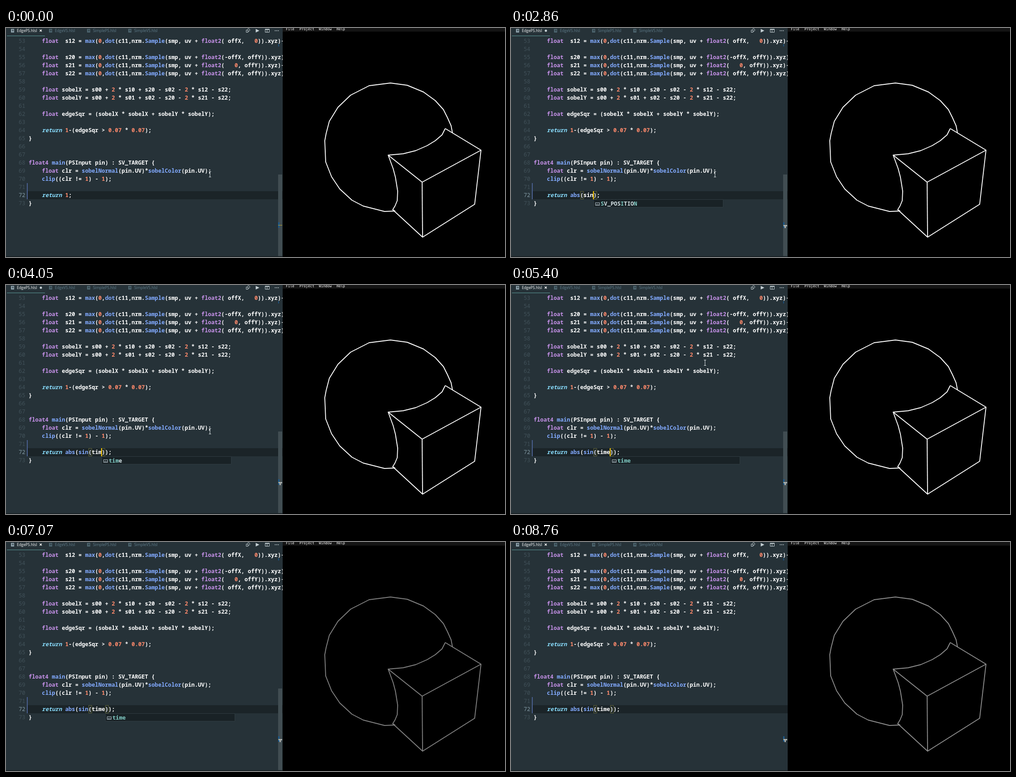
Write an HTML page with a canvas that moves like this. It is 1102x508 px and loops after 8.86 s.

```html
<!DOCTYPE html>
<html lang="en">
<head>
<meta charset="utf-8">
<title>Shader editing</title>
<style>
html, body { margin: 0; width: 100%; height: 100%; overflow: hidden; background: #000; }
canvas { display: block; }
</style>
</head>
<body>
<canvas id="stage" width="1102" height="508"></canvas>
<script>
const ctx = document.getElementById('stage').getContext('2d');
const LOOP = 8860, CHAR = 7.333, LEFT = 50, ROW = 18, FIRST = 53, BLINK = 470;
const CODE = 'bold 12.2px "Noto Sans Mono", monospace';
const colX = col => LEFT + col * CHAR;
const rowY = line => 29 + (line - FIRST) * ROW;

const source = `    float  s12 = max(0,dot(c11,nrm.Sample(smp, uv + float2( offX,   0)).xyz)-

    float  s20 = max(0,dot(c11,nrm.Sample(smp, uv + float2(-offX, offY)).xyz)-
    float  s21 = max(0,dot(c11,nrm.Sample(smp, uv + float2(   0, offY)).xyz)-
    float  s22 = max(0,dot(c11,nrm.Sample(smp, uv + float2( offX, offY)).xyz)-

    float sobelX = s00 + 2 * s10 + s20 - s02 - 2 * s12 - s22;
    float sobelY = s00 + 2 * s01 + s02 - s20 - 2 * s21 - s22;

    float edgeSqr = (sobelX * sobelX + sobelY * sobelY);

    return 1-(edgeSqr > 0.07 * 0.07);
}


float4 main(PSInput pin) : SV_TARGET {
    float clr = sobelNormal(pin.UV)*sobelColor(pin.UV);
    clip((clr != 1) - 1);


}`.split('\n');

// Typing: time, expression with | as caret, suggestions
const keys = [
  [-770, '1|'], [790, '|'], [1000, 'a|'], [1210, 'ab|'], [1460, 'abs|'],
  [1830, 'abs(|)'],
  [2510, 'abs(s|)'],
  [2580, 'abs(s|)', ['s00', 's01', 's02', 's10', 's12', 's20']],
  [2650, 'abs(si|)', ['SV_POSITION', 'PSInput', 'position']],
  [2800, 'abs(sin|)', ['SV_POSITION']],
  [3230, 'abs(sin(|))'],
  [3720, 'abs(sin(t|))'],
  [3790, 'abs(sin(t|))', ['time', 'tex', 'tangent', 'float', 'float2', 'float4']],
  [3860, 'abs(sin(ti|))', ['time']],
  [4050, 'abs(sin(tim|))', ['time']],
  [4260, 'abs(sin(time|))', ['time']]
];
const EDITED = 790, SAVED = 4750, MOUSE_LEFT = 7780, POPUP_END = 8690;

const outline = [
  [[986,233],[983,217],[975,199],[966,181],[948,161],[922,142],[886,127],[849,122],[802,128],
   [761,149],[733,176],[714,207],[707,234],[704,250],[706,297],[719,330],[737,357],[764,382],
   [789,395],[836,407],[859,406],[854,403]],
  [[970,223],[963,237],[948,250],[930,261],[905,272],[877,279],[844,282],[855,312],[860,331],
   [865,362],[864,383],[859,395],[854,403],[920,464],[1035,391],[1049,271],[970,223]],
  [[844,282],[919,342],[1049,271]],
  [[919,342],[920,464]]
];

function rect(x, y, w, h, color) {
  ctx.fillStyle = color;
  ctx.fillRect(x, y, w, h);
}
function frame(x, y, w, h, color) {
  ctx.strokeStyle = color;
  ctx.lineWidth = 1;
  ctx.strokeRect(x + .5, y + .5, w - 1, h - 1);
}
function text(str, x, y, color, font) {
  ctx.font = font;
  ctx.fillStyle = color;
  ctx.fillText(str, x, y);
}
function path(points, color, width = 1) {
  ctx.beginPath();
  points.forEach(p => ctx.lineTo(p[0], p[1]));
  ctx.strokeStyle = color;
  ctx.lineWidth = width;
  ctx.stroke();
}
function shape(points, color) {
  ctx.beginPath();
  points.forEach(p => ctx.lineTo(p[0], p[1]));
  ctx.fillStyle = color;
  ctx.fill();
}
function dot(x, y, r, color) {
  ctx.beginPath();
  ctx.arc(x, y, r, 0, 7);
  ctx.fillStyle = color;
  ctx.fill();
}
// Position along [time, x, y] stops
function along(stops, t) {
  let i = 1;
  while (i < stops.length - 1 && t > stops[i][0]) i++;
  const [a, b] = [stops[i - 1], stops[i]];
  const f = Math.min(1, Math.max(0, (t - a[0]) / (b[0] - a[0])));
  return [a[1] + (b[1] - a[1]) * f, a[2] + (b[2] - a[2]) * f];
}

function codeLine(str, line) {
  for (const m of str.matchAll(/[A-Za-z_]\w*|\d+(\.\d+)?|\S/g)) {
    const word = m[0], next = str[m.index + word.length];
    let color = '#fff', style = '';
    if (word === 'return') { color = '#89ddff'; style = 'italic '; }
    else if (/^float\d?$/.test(word)) color = '#c792ea';
    else if (/^\d/.test(word)) color = '#ff8a6c';
    else if (/^\w/.test(word) && next === '(') color = '#82aaff';
    text(word, colX(m.index), rowY(line) + 4, color, style + CODE);
  }
}

function fileTab(x, name, active) {
  rect(x - 13, 2, 7, 8, active ? '#90a4ae' : '#4d656f');
  rect(x - 11, 4, 4, 1, '#263238');
  rect(x - 11, 6, 4, 1, '#263238');
  text(name, x, 9, active ? '#fff' : '#607d8b', '8.4px "Open Sans", sans-serif');
}

function tabs(t) {
  fileTab(24, 'EdgePS.hlsl', true);
  fileTab(108, 'EdgeVS.hlsl');
  fileTab(192, 'SimplePS.hlsl');
  fileTab(283, 'SimpleVS.hlsl');
  rect(2, 17, 84, 1, '#5a9a97');
  if (t >= EDITED && t < SAVED) dot(77, 6, 2.5, '#c5d0d4');
  else {
    path([[74.5, 3.5], [79, 8]], '#fff', 1.2);
    path([[79, 3.5], [74.5, 8]], '#fff', 1.2);
  }
  const icon = '#c5d0d4';
  frame(530, 4, 5, 6, icon);
  ctx.beginPath();
  ctx.arc(535.5, 4.5, 3, -2.6, 2.2);
  ctx.stroke();
  shape([[551.5, 2], [559.5, 6], [551.5, 10]], icon);
  frame(572, 2, 10, 8, icon);
  rect(572, 2, 10, 2, icon);
  rect(576, 2, 1, 8, icon);
  [594.5, 598, 601.5].forEach(x => dot(x, 6, 1, icon));
}

function popup(x, query, items) {
  rect(x, 380, 287, 18 * items.length, '#222d32');
  rect(x, 380, 287, 18, '#192226');
  frame(x, 380, 287, 18 * items.length, '#303c42');
  items.forEach((item, i) => {
    const y = 389 + i * ROW;
    frame(x + 4, y - 2, 10, 7, '#b0bec5');
    text('abc', x + 5.5, y + 3.5, '#b0bec5', '4.5px "Open Sans", sans-serif');
    let hit = 0;
    [...item].forEach((c, n) => {
      const match = hit < query.length && c.toLowerCase() === query[hit];
      if (match) hit++;
      text(c, x + 16 + n * CHAR, y + 5, match ? '#80cbc4' : '#d5e3e6', CODE);
    });
  });
}

function editor(t) {
  rect(0, 0, 611, 508, '#263238');
  rect(48, 362, 563, 18, '#1b2428');
  const [since, typed, items] = keys.filter(k => k[0] <= t).pop();
  const start = 11, at = typed.indexOf('|');
  const expression = typed.replace('|', '');
  const caretX = colX(start + at);
  const open = expression.lastIndexOf('(', at - 1);

  ctx.save();
  ctx.beginPath();
  ctx.rect(0, 0, 611, 508);
  ctx.clip();
  source.forEach((str, i) => {
    const line = FIRST + i;
    text(line, 28, rowY(line) + 4, line === 72 ? '#8299a3' : '#415159',
      '12.2px "Noto Sans Mono", monospace');
    codeLine(line === 72 ? `    return ${expression};` : str, line);
  });
  ctx.restore();
  rect(46, 344, 2, 36, '#4a6090');

  if (at > 0 && open >= 0) {
    for (const n of [open, at]) frame(Math.round(colX(start + n)), 362, 8, 18, '#5f6338');
  }
  if (Math.floor((t - since) / BLINK) % 2 === 0) rect(Math.round(caretX) - 1, 362, 2, 18, '#ffcc00');

  if (t < MOUSE_LEFT) rect(601, 325, 9, 181, '#414d52');
  rect(601, 36, 2, 5, '#1d4f7c');
  rect(601, 431, 3, 12, '#1d5a8c');
  rect(601, 437, 9, 1, '#b9a32e');
  if (open >= 0) {
    rect(602, 437, 8, 3, '#a8adab');
    rect(604, 440, 3, 4, '#a8adab');
  }
  if (items && t < POPUP_END) {
    const query = expression.slice(open + 1, at);
    popup(Math.round(caretX), query, items);
  }
  tabs(t);
  rect(0, 506, 611, 2, '#192226');
}

function brightness(t) {
  if (t < SAVED) return 1;
  const zero = 7950, rate = t < zero ? .6 : .72;
  return Math.abs(Math.sin((t - zero) / 1000 * rate));
}

function viewport(t) {
  rect(611, 0, 491, 508, '#000');
  rect(611, 0, 491, 8, '#141414');
  [['File', 618], ['Project', 648], ['Window', 691], ['Help', 730]].forEach(([name, x]) =>
    text(name, x, 4.5, '#fff', '7.8px "DejaVu Sans Mono", monospace'));
  const v = Math.round(255 * brightness(t));
  ctx.lineJoin = 'round';
  outline.forEach(points => path(points, `rgb(${v},${v},${v})`, 1.9));
}

function pointer(t) {
  if (t < 6390) {
    const [x, y] = along([[5100, 450, 324], [5230, 440, 146], [5450, 425, 180],
      [5900, 428, 299], [6390, 428, 299]], t).map(Math.round);
    rect(x, y - 5, 1, 11, '#dce3e5');
    rect(x - 2, y - 6, 5, 1, '#dce3e5');
    rect(x - 2, y + 6, 5, 1, '#dce3e5');
  } else if (t >= MOUSE_LEFT && t < 8640) {
    const [x, y] = along([[7810, 1028, 480], [8250, 1060, 512]], t);
    shape([[0, 0], [0, 10.5], [2.4, 8.4], [4, 12], [5.8, 11.2], [4.2, 7.7], [7.3, 7.5]]
      .map(p => [x + p[0], y + p[1]]), '#fff');
  }
}

function draw() {
  const t = performance.now() % LOOP;
  viewport(t);
  editor(t);
  pointer(t);
  requestAnimationFrame(draw);
}
draw();
</script>
</body>
</html>
```
